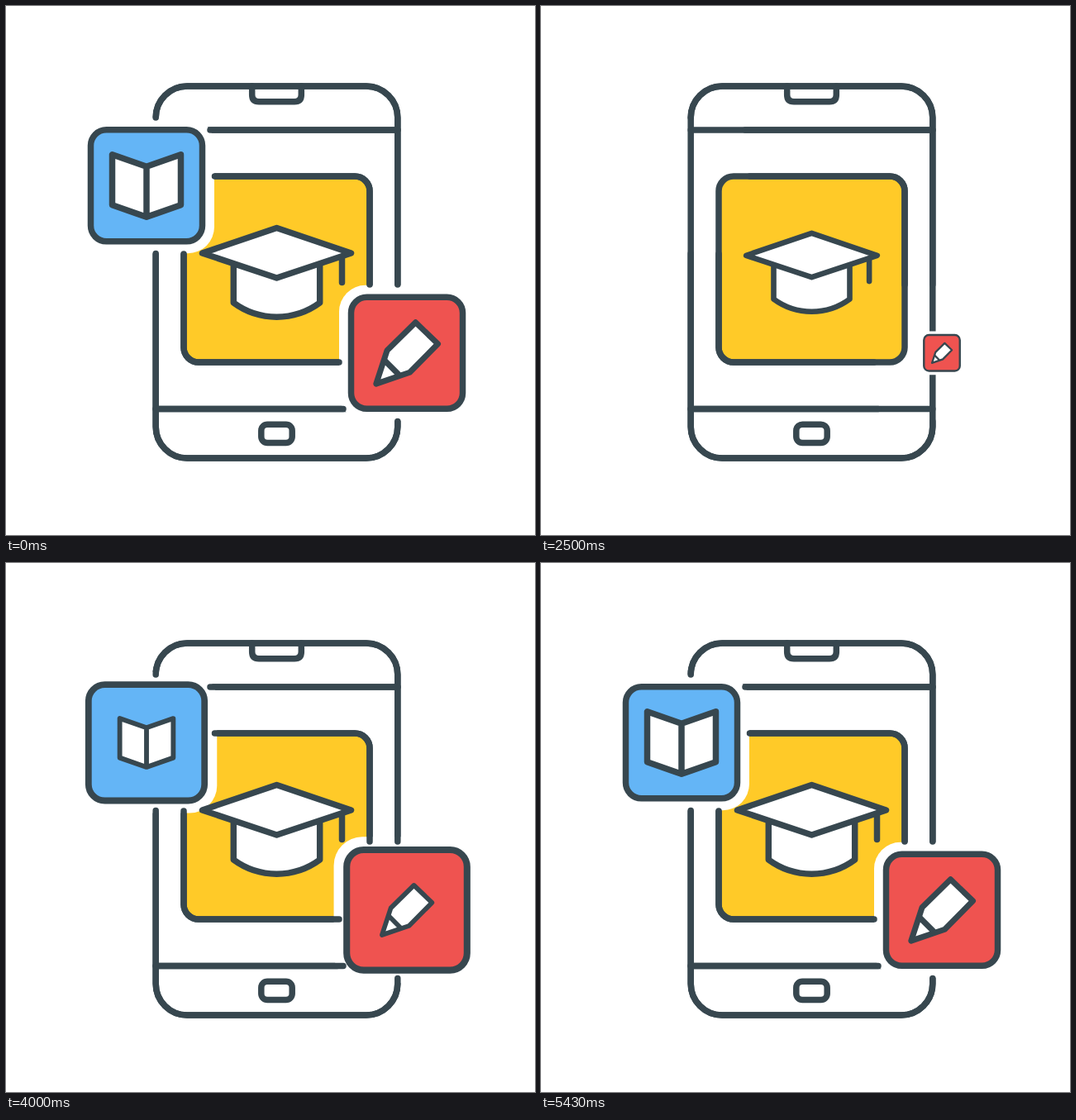
An HTML page that plays this animation: 640 by 640 pixels, repeating every 6 s.

```html
<!DOCTYPE html>
<html lang="en">
<head>
<meta charset="utf-8">
<title>Mobile learning</title>
<style>
  html, body { margin: 0; width: 100%; height: 100%; overflow: hidden; background: #fff; }
  svg { display: block; width: 100%; height: 100%; }
  .line { fill: none; stroke: #37474f; stroke-width: 7.5; stroke-linecap: round; stroke-linejoin: round; }
  .white { fill: #fff; }
</style>
</head>
<body>
<svg viewBox="0 0 640 640">
  <!-- complete outlines, seen when the badges are away -->
  <g class="line">
    <rect x="181.2" y="97" width="292.6" height="450" rx="38"/>
    <path d="M181.2 150H473.8M181.2 487.5H473.8"/>
    <rect x="215" y="206" width="225" height="225" rx="18" fill="#ffca28"/>
  </g>

  <!-- white gaps around the badges -->
  <g class="white">
    <rect id="blueHalo" x="-82" y="-82" width="164" height="164" rx="32"/>
    <rect id="redHalo" x="-82" y="-82" width="164" height="164" rx="32"/>
  </g>

  <!-- outlines that always stay, with round ends -->
  <g class="line">
    <path d="M181.2 135A38 38 0 0 1 219.2 97H435.8A38 38 0 0 1 473.8 135V337"/>
    <path d="M181.2 299.5V509A38 38 0 0 0 219.2 547H435.8A38 38 0 0 0 473.8 509V502.5"/>
    <path d="M247 150H473.8M181.2 487.5H408"/>
    <path d="M252.5 206H422A18 18 0 0 1 440 224V337M215 300V413A18 18 0 0 0 233 431H403"/>
    <path d="M297.7 97V107.5Q297.7 115.7 306 115.7H349Q357.3 115.7 357.3 107.5V97"/>
    <rect id="button" x="-18.7" y="-11.2" width="37.4" height="22.4" rx="7.5"/>
    <g id="cap">
      <path class="white" d="M-52.2-12V36.5A88 88 0 0 0 52.2 36.5V-12"/>
      <path class="white" d="M-90-23.5L0-54L90-23.5L0 6.5Z"/>
      <path d="M79-19V12"/>
    </g>
  </g>

  <g class="line" id="blue">
    <rect x="-67.5" y="-67.5" width="135" height="135" rx="19" fill="#64b5f6"/>
    <path id="book" class="white" d="M0-23L-41.5-37.5V23.5L0 38L41.5 23.5V-37.5ZV38"/>
  </g>
  <g class="line" id="red">
    <rect x="-67.5" y="-67.5" width="135" height="135" rx="19" fill="#ef5350"/>
    <g id="pencil" stroke-width="7">
      <path class="white" d="M10.5-37L37.5-11L3.5 23.5L-37.2 37.3L-24-3Z"/>
      <path d="M-26.5 9.5L-10.5 25.5"/>
    </g>
  </g>
</svg>
<script>
  const LOOP = 6000;
  const STEPS = 84;
  const BLUE = [170, 217.3];
  const RED = [485, 419.8];
  const STAGGER = 214;

  const linear = u => u;
  const easeIn = u => u * u;
  const easeOut = u => 1 - (1 - u) ** 2;

  // Keys are [time, value, easing towards this key].
  const badgeKeys = [
    [1790, 1], [2072, 1.05], [2329, 0, easeIn],
    [3303, 0], [3667, 1.1, easeOut], [4220, 1]
  ];
  const iconKeys = [[2800, 1], [2801, 0.75], [4220, 0.75], [5214, 1]];
  const capKeys = [[1790, 1], [2985, 0.8], [3893, 1]];
  const buttonKeys = [[2500, 1], [3135, 0.71], [3780, 1]];

  function valueAt(keys, t) {
    const next = keys.findIndex(key => key[0] > t);
    if (next === 0) return keys[0][1];
    if (next < 0) return keys[keys.length - 1][1];
    const [t0, v0] = keys[next - 1];
    const [t1, v1, ease = linear] = keys[next];
    return v0 + (v1 - v0) * ease((t - t0) / (t1 - t0));
  }

  function place(id, [x, y], scale) {
    document.getElementById(id)
      .setAttribute("transform", `translate(${x} ${y}) scale(${scale})`);
  }

  function drawBadge(name, icon, centre, t) {
    const scale = valueAt(badgeKeys, t);
    place(name + "Halo", centre, scale);
    place(name, centre, scale);
    place(icon, [0, 0], valueAt(iconKeys, t));
  }

  function draw(t) {
    drawBadge("blue", "book", BLUE, t);
    drawBadge("red", "pencil", RED, t - STAGGER);
    place("cap", [327.5, 322.5], valueAt(capKeys, t));
    place("button", [327.5, 517.4], valueAt(buttonKeys, t));
  }

  // The picture advances in 14 even steps per second.
  function tick() {
    const t = performance.now() % LOOP;
    const step = Math.floor(t * STEPS / LOOP + 0.1) % STEPS;
    draw(step * LOOP / STEPS);
    requestAnimationFrame(tick);
  }
  tick();
</script>
</body>
</html>
```
